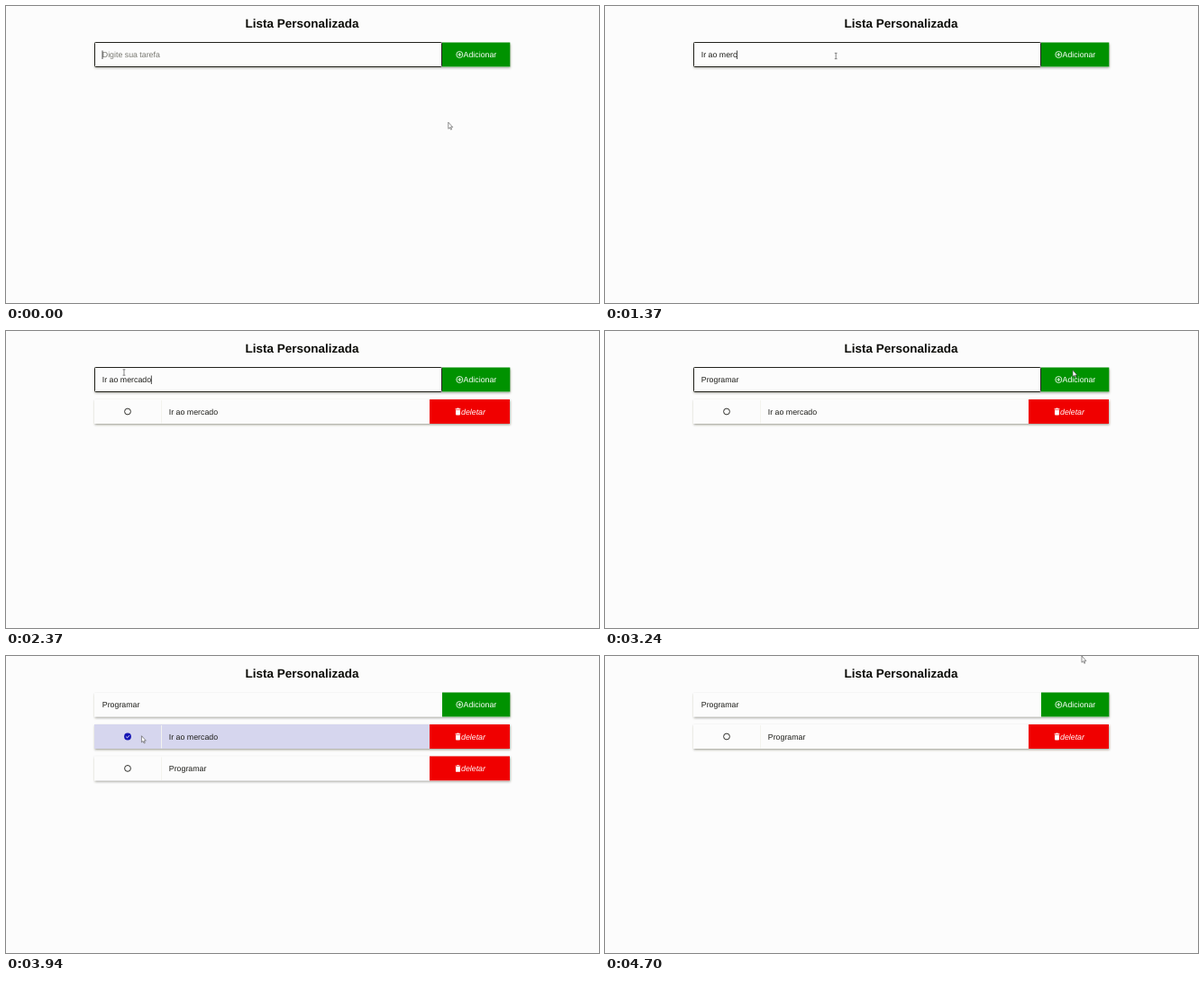
These frames come from a looping animation (658 px wide and 330 px high, 4.73 s). An HTML page:

```html
<!DOCTYPE html>
<html lang="pt-BR">
<head>
<meta charset="utf-8">
<title>Lista Personalizada</title>
<style>
  html, body { margin: 0; width: 100%; height: 100%; overflow: hidden; background: #fcfcfc; }
  svg { display: block; width: 658px; height: 330px; }
  text {
    font: 8.8px "Liberation Sans", Arial, sans-serif; fill: #1c1c18;
    white-space: pre; text-rendering: geometricPrecision;
  }
  .title { font-size: 13.5px; font-weight: bold; fill: #0c0c08; }
  .label { fill: #fff; }
  .bin { font-style: italic; }
</style>
</head>
<body>
<svg viewBox="0 0 658 330">
  <defs>
    <filter id="shade" x="-5%" y="-30%" width="110%" height="170%">
      <feDropShadow dx="0.6" dy="1.3" stdDeviation="1.3" flood-color="#333328" flood-opacity=".45"/>
    </filter>
    <g id="row">
      <path d="M172.5 1V26.5" stroke="#f3f3ee" stroke-width="1"/>
      <rect x="470" width="89" height="27" fill="#f00000"/>
      <path d="M498.6 10.3h1.7l.5-.7h1.4l.5.7h1.7v.9h-5.8zM499 11.7h5v4.8q0 .9-.9.9h-3.2q-.9 0-.9-.9z" fill="#fff"/>
      <text class="label bin" x="505" y="16.7">deletar</text>
    </g>
  </defs>
  <rect width="658" height="330" fill="#fcfcfc"/>
  <text class="title" x="328.5" y="24.4" text-anchor="middle">Lista Personalizada</text>

  <rect x="98" y="41" width="461" height="26.5" fill="#fcfcfc" filter="url(#shade)"/>
  <rect x="484" y="40.5" width="75.3" height="27" fill="#009200"/>
  <g fill="none" stroke="#fff" stroke-width=".85">
    <circle cx="503.3" cy="54" r="3.5"/>
    <path d="M501.3 54h4M503.3 52v4"/>
  </g>
  <text class="label" x="507.6" y="57.2">Adicionar</text>
  <rect id="focus" x="98.5" y="40.5" width="385" height="27" rx=".8" fill="none" stroke="#22221c" stroke-width="1"/>
  <text id="field" x="106.8" y="57.2"></text>
  <rect id="caret" y="49.5" width=".8" height="9.5" fill="#222"/>

  <g id="list"></g>

  <path id="arrow" d="M0 0V7.2L1.6 5.8 2.8 8.2 3.8 7.8 2.7 5.4H4.9Z" fill="#fff" stroke="#444" stroke-width=".6"/>
  <path id="beam" d="M-1.4 -3.2H1.4M0 -3.2V3.2M-1.4 3.2H1.4" fill="none" stroke="#555" stroke-width=".7"/>
</svg>
<script>
const LOOP = 4730;
const FIRST = "Ir ao mercado", SECOND = "Programar";
const ADD_1 = 1910, REFOCUS = 2250, ADD_2 = 3330, BLUR_2 = 3270, CHECK = 3850, REMOVE = 4260;
const $ = id => document.getElementById(id);
const show = (el, on) => el.setAttribute("display", on ? "inline" : "none");

// Pointer stops: time, x, y
const stops = [
  [0, 490.8, 129.2], [60, 490.8, 129.2], [550, 300, 238], [980, 256.2, 55.5],
  [1500, 256.2, 55.5], [1800, 522, 55], [1960, 522, 55], [2240, 178, 54],
  [2370, 131, 46], [2580, 26, 46], [2720, 26, 46], [2930, 190, 14],
  [3200, 519, 43.5], [3400, 519, 43.5], [3740, 145, 88.5], [3810, 135, 88.5],
  [3910, 135, 88.5], [4170, 528, 94], [4290, 528, 94], [4640, 529, 0], [LOOP, 529, 0]
];

function pointerAt(t) {
  const i = Math.max(1, stops.findIndex(s => s[0] > t));
  const [t0, x0, y0] = stops[i - 1], [t1, x1, y1] = stops[i];
  const p = (t - t0) / (t1 - t0), e = p * p * (3 - 2 * p);
  return [x0 + (x1 - x0) * e, y0 + (y1 - y0) * e];
}

const keys = (t, start, step) => Math.max(0, Math.floor((t - start) / step) + 1);

function fieldText(t) {
  if (t < 2420) return FIRST.slice(0, keys(t, 1035, 35));
  if (t < 2700) return FIRST.slice(0, Math.max(0, FIRST.length - keys(t, 2420, 19)));
  return SECOND.slice(0, keys(t, 2700, 33));
}

function makeRow() {
  const g = document.createElementNS("http://www.w3.org/2000/svg", "g");
  g.innerHTML = `
    <rect x="98" width="461" height="27" filter="url(#shade)"/>
    <use href="#row"/>
    <circle cx="135" cy="13.5" stroke-width=".9"/>
    <path d="M133.2 13.6l1.3 1.3 2.4-2.6" fill="none" stroke="#fff" stroke-width=".9"/>
    <text x="180.8" y="16.7"></text>`;
  $("list").append(g);
  const [box, , dot, tick, label] = g.children;
  return { g, box, dot, tick, label };
}

function setRow(row, y, text, done) {
  show(row.g, text);
  row.g.setAttribute("transform", `translate(0 ${y})`);
  row.label.textContent = text;
  row.box.setAttribute("fill", done ? "#d6d6ee" : "#fcfcfc");
  row.dot.setAttribute("r", done ? 3.9 : 3.4);
  row.dot.setAttribute("fill", done ? "#1414b4" : "none");
  row.dot.setAttribute("stroke", done ? "none" : "#1c1c18");
  show(row.tick, done);
}

const rows = [makeRow(), makeRow()];

function draw(t) {
  const typed = fieldText(t);
  const focused = t < 1870 || (t >= REFOCUS && t < BLUR_2);
  const field = $("field");
  field.textContent = typed || "Digite sua tarefa";
  field.style.fill = typed ? "#1c1c18" : "#777770";
  show($("focus"), focused);
  show($("caret"), focused && t < 3220 && !(t > 530 && t < 1030));
  $("caret").setAttribute("x", 106.6 + (typed ? field.getComputedTextLength() : 0));

  const items = [];
  if (t >= ADD_1 && t < REMOVE) items.push([FIRST, t >= CHECK]);
  if (t >= ADD_2) items.push([SECOND, false]);
  rows.forEach((row, i) => {
    const [text, done] = items[i] || ["", false];
    setRow(row, 76 + i * 35.4, text, done);
  });

  const [x, y] = pointerAt(t);
  const inField = x > 98 && x < 484 && y > 40 && y < 68;
  for (const [id, on] of [["arrow", !inField], ["beam", inField]]) {
    show($(id), on);
    $(id).setAttribute("transform", `translate(${x.toFixed(2)} ${y.toFixed(2)})`);
  }
}

const begin = performance.now();
function tick() {
  draw((performance.now() - begin) % LOOP);
  requestAnimationFrame(tick);
}
tick();
</script>
</body>
</html>
```
